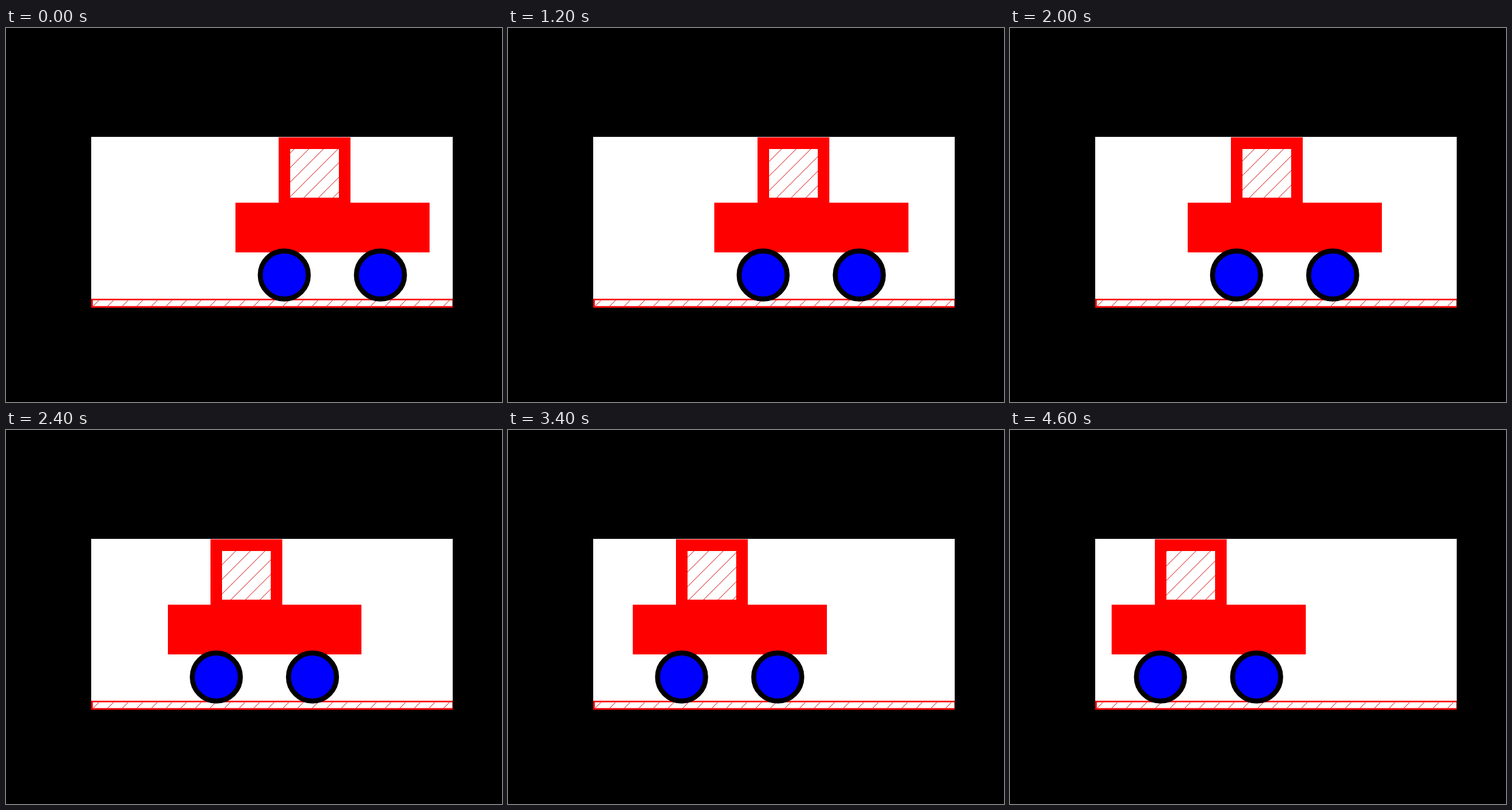
An HTML page with a canvas that plays this animation: 815x615 px, repeating every 5000 ms.

```html
<!DOCTYPE html>
<html lang="en">
<head>
<meta charset="utf-8">
<title>Truck</title>
<style>
html, body { margin: 0; width: 100%; height: 100%; overflow: hidden; background: #000; }
canvas { display: block; }
</style>
</head>
<body>
<canvas id="stage" width="815" height="615"></canvas>
<script>
const ctx = document.getElementById('stage').getContext('2d');
const LOOP = 5000, STEP = 200, LAST = 23;
const MID = 272.125;
// Distance from the middle; the second half mirrors the first.
const SWING = [105, 103, 99, 93, 86, 77, 67, 56.5, 45, 32.5, 20, 6.625];
const RED = '#f00';

function box(x1, y1, x2, y2, color) {
  ctx.fillStyle = color;
  ctx.fillRect(x1, y1, x2 - x1, y2 - y1);
}

// The hatching stays fixed to the page: x + y is a multiple of 24.
function hatch(x1, y1, x2, y2) {
  ctx.save();
  ctx.beginPath();
  ctx.rect(x1, y1, x2 - x1, y2 - y1);
  ctx.clip();
  ctx.beginPath();
  for (let s = Math.floor((x1 + y1) / 24) * 24; s <= x2 + y2 + 24; s += 24) {
    ctx.moveTo(s + 0.5 - y1, y1);
    ctx.lineTo(s + 0.5 - y2, y2);
  }
  ctx.strokeStyle = '#d00000';
  ctx.lineWidth = 1;
  ctx.stroke();
  ctx.restore();
}

function wheel(x) {
  ctx.beginPath();
  ctx.arc(x, 406.2, 39.5, 0, Math.PI * 2);
  ctx.fillStyle = '#00f';
  ctx.fill();
  ctx.strokeStyle = '#000';
  ctx.lineWidth = 8.2;
  ctx.stroke();
}

function road() {
  box(140, 445.3, 734, 460, RED);
  box(142.7, 447.7, 733.4, 457.3, '#fff');
  hatch(142.7, 447.7, 733.4, 457.3);
}

function truck(x) {
  const at = d => Math.round(x + d);
  box(at(0), 287.3, at(318.75), 369, RED);
  box(at(70.7), 179.7, at(188.7), 288, RED);
  const left = at(89.9), right = left + 80;
  box(left, 199, right, 279, '#fff');
  hatch(left, 199, right, 279);
  wheel(x + 80.1);
  wheel(x + 238.1);
}

function position(t) {
  const k = Math.min(LAST, Math.floor(t / STEP));
  return k < SWING.length ? MID + SWING[k] : MID - SWING[LAST - k];
}

function draw(t) {
  box(0, 0, 815, 615, '#000');
  box(140, 179, 734, 460, '#fff');
  road();
  truck(position(t));
}

const start = performance.now();
function tick() {
  draw((performance.now() - start) % LOOP);
  requestAnimationFrame(tick);
}
tick();
</script>
</body>
</html>
```
